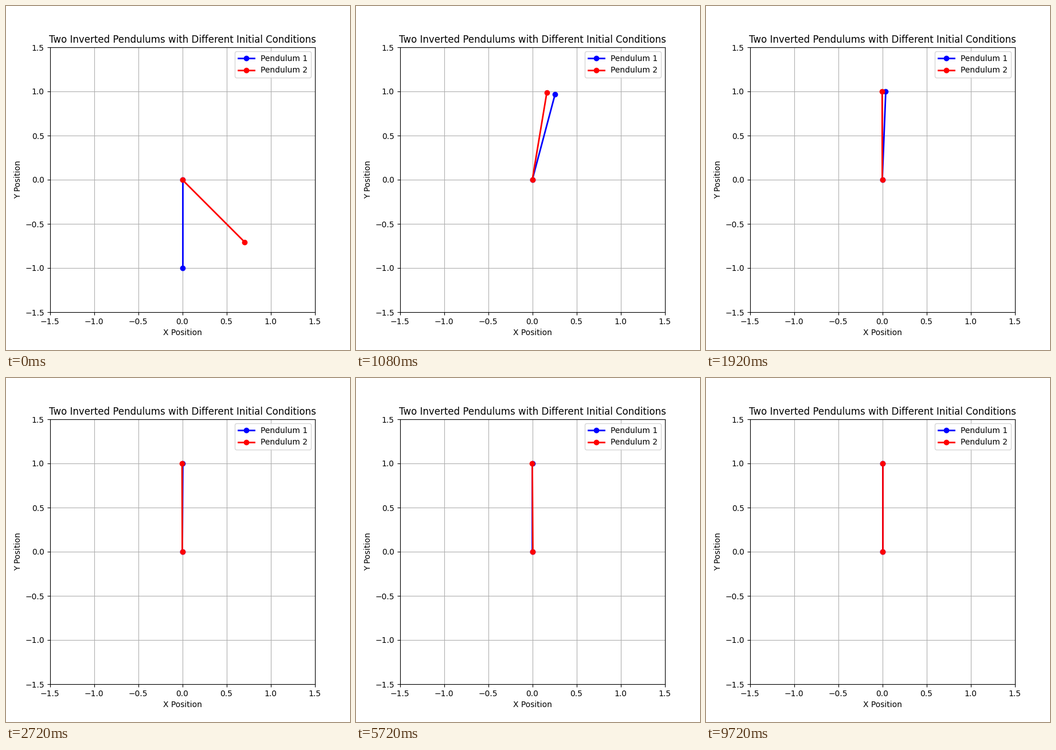
Write a matplotlib script that moves like this. It is 600x600 px and loops after 10 s.

```python
import numpy as np
import matplotlib.pyplot as plt
from matplotlib.animation import FuncAnimation

FRAMES, INTERVAL = 500, 20
DT = INTERVAL / 1000
SUBSTEPS = 10

GRAVITY = 9.81
FRICTION = 0.05
KP = 50.0


def simulate(angle, kd):
    """Angle from upright over time under PD control, starting at rest."""
    def rate(s):
        accel = GRAVITY * np.sin(s[0]) - KP * s[0] - (kd + FRICTION) * s[1]
        return np.array([s[1], accel])

    h = DT / SUBSTEPS
    state = np.array([angle, 0.0])
    angles = []
    for _ in range(FRAMES):
        angles.append(state[0])
        for _ in range(SUBSTEPS):
            k1 = rate(state)
            k2 = rate(state + h / 2 * k1)
            k3 = rate(state + h / 2 * k2)
            k4 = rate(state + h * k3)
            state = state + h / 6 * (k1 + 2 * k2 + 2 * k3 + k4)
    return np.array(angles)


paths = [simulate(np.pi, 20.0), simulate(3 * np.pi / 4, 5.0)]

plt.rcParams["font.family"] = "DejaVu Sans"
fig, ax = plt.subplots(figsize=(6, 6), dpi=100)
ax.set_xlim(-1.5, 1.5)
ax.set_ylim(-1.5, 1.5)
ax.set_aspect("equal")
ax.grid(True)
ax.set_title("Two Inverted Pendulums with Different Initial Conditions")
ax.set_xlabel("X Position")
ax.set_ylabel("Y Position")

rods = [
    ax.plot([], [], "o-", color=color, lw=2, label=f"Pendulum {i}")[0]
    for i, color in enumerate(("blue", "red"), 1)
]
ax.legend(loc="upper right")


def update(frame):
    for rod, path in zip(rods, paths):
        angle = path[frame]
        rod.set_data([0, np.sin(angle)], [0, np.cos(angle)])
    return rods


def init():
    return update(0)


anim = FuncAnimation(fig, update, frames=FRAMES, init_func=init,
                     interval=INTERVAL, blit=True, repeat=True, repeat_delay=0)
plt.show()
```
